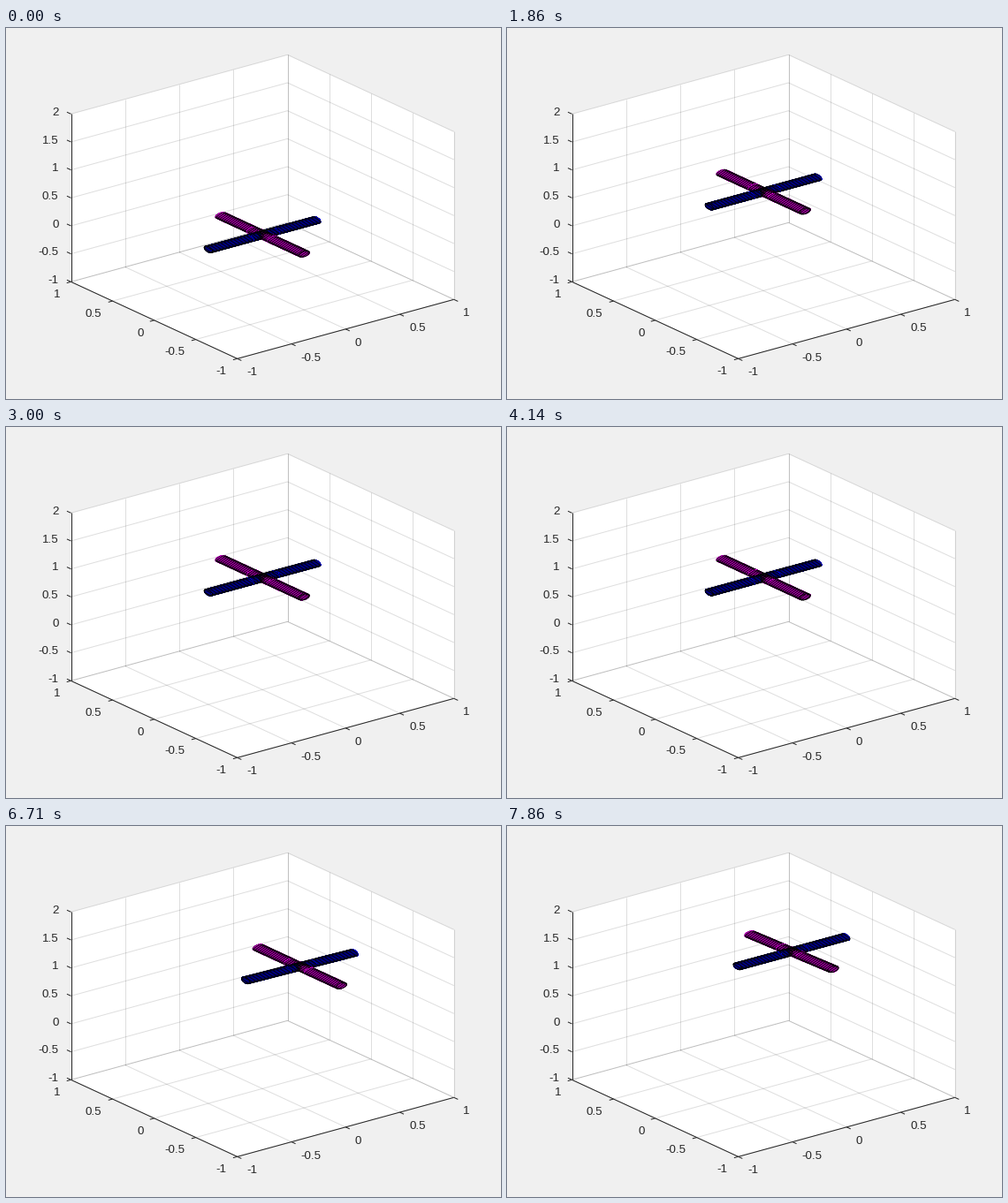
Recreate the animation shown at these times as a matplotlib script. Size 560x420 px, loop 8000 ms.

```python
import numpy as np
import matplotlib.pyplot as plt
from matplotlib.animation import FuncAnimation
from matplotlib.collections import LineCollection, PolyCollection

W, H, DPI = 560, 420, 100
STEPS, SUBFRAMES, LOOP_MS = 56, 3, 8000
FRAMES = STEPS * SUBFRAMES
PX = 72 / DPI                       # points per pixel
INK, GRID = "#262626", (0.15, 0.15, 0.15, 0.15)

# Orthographic projection of data space onto the stage
ORIGIN = np.array([289.6, 233.5])
BASIS = np.array([[122.5, -33.5], [-94.1, -43.5], [0, -63.33]])
TOWARD_VIEWER = np.array([-0.769, -1.0, 1.096])

RADIUS, SIDES = 0.05, 20
STATIONS = np.r_[-0.5, np.linspace(-0.12, 0.12, 13), 0.5]
EDGE_BIAS = 0.05                    # lifts edges above neighbouring faces


def project(points):
    return ORIGIN + np.asarray(points, float) @ BASIS


def grid_lines():
    lines = []
    for v in np.linspace(-1, 1, 5):
        lines += [[(v, -1, -1), (v, 1, -1)], [(v, 1, -1), (v, 1, 2)],
                  [(-1, v, -1), (1, v, -1)], [(1, v, -1), (1, v, 2)]]
    for z in np.linspace(-1, 2, 7):
        lines += [[(-1, 1, z), (1, 1, z)], [(1, 1, z), (1, -1, z)]]
    return [project(line) for line in lines]


def draw_axes(ax):
    walls = [[(-1, -1, -1), (1, -1, -1), (1, 1, -1), (-1, 1, -1)],
             [(-1, 1, -1), (1, 1, -1), (1, 1, 2), (-1, 1, 2)],
             [(1, 1, -1), (1, -1, -1), (1, -1, 2), (1, 1, 2)]]
    ax.add_collection(PolyCollection([project(w) for w in walls],
                                     facecolor="white", edgecolor="none"))
    ax.add_collection(LineCollection(grid_lines(), colors=[GRID], linewidths=PX))

    lines = [project(e) for e in ([(-1, -1, -1), (1, -1, -1)],
                                  [(-1, -1, -1), (-1, 1, -1)],
                                  [(-1, 1, -1), (-1, 1, 2)])]

    def ticks(values, place, tick, offset, align):
        for v in values:
            p = project(place(v))
            lines.append([p, p + tick])
            ax.text(p[0] + offset[0], p[1] + offset[1] + 4.8, f"{v:g}",
                    ha=align, va="baseline", color=INK,
                    family="Liberation Sans", fontsize=13.33 * PX)

    side = np.linspace(-1, 1, 5)
    ticks(side, lambda v: (v, -1, -1), (4.6, 2.1), (10.7, 14.2), "left")
    ticks(side, lambda v: (-1, v, -1), (-4.8, 1.3), (-12.2, 13), "right")
    ticks(np.linspace(-1, 2, 7), lambda v: (-1, 1, v), (-4.6, -2.1),
          (-14, -3), "right")
    ax.add_collection(LineCollection(lines, colors=INK, linewidths=PX))


def tube(axis):
    """Grid of tube points, indexed by station and angle."""
    angle = np.linspace(0, 2 * np.pi, SIDES + 1)
    s, a = np.meshgrid(STATIONS, angle, indexing="ij")
    u, v = RADIUS * np.cos(a), RADIUS * np.sin(a)
    return np.stack((s, u, v) if axis == "x" else (u, s, v), axis=-1)


def tube_parts(p):
    """Faces, then the lengthwise and end-ring edges of one tube."""
    faces = np.stack([p[:-1, :-1], p[1:, :-1], p[1:, 1:], p[:-1, 1:]], axis=2)
    along = np.stack([p[:-1, :-1], p[1:, :-1]], axis=2)
    rings = np.stack([p[[0, -1], :-1], p[[0, -1], 1:]], axis=2)
    edges = np.concatenate([along.reshape(-1, 2, 3), rings.reshape(-1, 2, 3)])
    return faces.reshape(-1, 4, 3), edges


def climb(t):
    """Critically damped step response."""
    u = 0.75 * max(t, 0)
    return 1 - (1 + u) * np.exp(-u)


def glide(t, slow=0.25, fast=1.5):
    """Overdamped step response for sideways travel."""
    t = max(t, 0)
    return 1 - (fast * np.exp(-slow * t) - slow * np.exp(-fast * t)) / (fast - slow)


def lean(t):
    return np.radians(22) * np.exp(-0.45 * t) if t > 0 else 0.0


def tilt(points, i, angle):
    """Lower the positive end of axis i by the given angle."""
    out = points.copy()
    c, s = np.cos(angle), np.sin(angle)
    out[..., i] = points[..., i] * c + points[..., 2] * s
    out[..., 2] = points[..., 2] * c - points[..., i] * s
    return out


ARMS = [(tube("x"), (0, 0, 1, 1)), (tube("y"), (1, 0, 1, 1))]


def scene(step):
    """Depth-sorted (depth, outline, fill, is_edge) parts."""
    tx, ty = step - 41.6, step - 50.9
    centre = np.array([0.5 * glide(tx), 0.5 * glide(ty), climb(step - 9.3)])
    parts = []
    for points, color in ARMS:
        posed = tilt(tilt(points, 0, lean(tx)), 1, lean(ty)) + centre
        faces, edges = tube_parts(posed)
        for shapes, bias, is_edge in ((faces, 0, False), (edges, EDGE_BIAS, True)):
            depths = shapes.mean(axis=1) @ TOWARD_VIEWER + bias
            parts += [(d, o, color, is_edge)
                      for d, o in zip(depths, project(shapes))]
    return sorted(parts, key=lambda part: part[0])


fig = plt.figure(figsize=(W / DPI, H / DPI), dpi=DPI, facecolor="#f0f0f0")
ax = fig.add_axes([0, 0, 1, 1])
ax.set(xlim=(-0.5, W - 0.5), ylim=(H - 0.5, -0.5))
ax.axis("off")
draw_axes(ax)
arms = PolyCollection([], closed=False, capstyle="round", zorder=5)
ax.add_collection(arms, autolim=False)


def update(frame):
    # The pose is held for several frames; each change lands one frame early
    # so that it is already visible at its nominal time.
    step = min((frame + 1) // SUBFRAMES, STEPS - 1)
    parts = scene(step)
    is_edge = np.array([part[3] for part in parts])
    outline = np.zeros((len(parts), 4))
    outline[:, 3] = is_edge
    arms.set_verts([part[1] for part in parts], closed=False)
    arms.set_facecolor(np.array([part[2] for part in parts], float))
    arms.set_edgecolor(outline)
    arms.set_linewidth(0.9 * PX * is_edge)
    arms.set_antialiased(is_edge)
    return (arms,)


anim = FuncAnimation(fig, update, frames=FRAMES, interval=LOOP_MS / FRAMES,
                     repeat=True, repeat_delay=0, blit=False)
plt.show()
```
